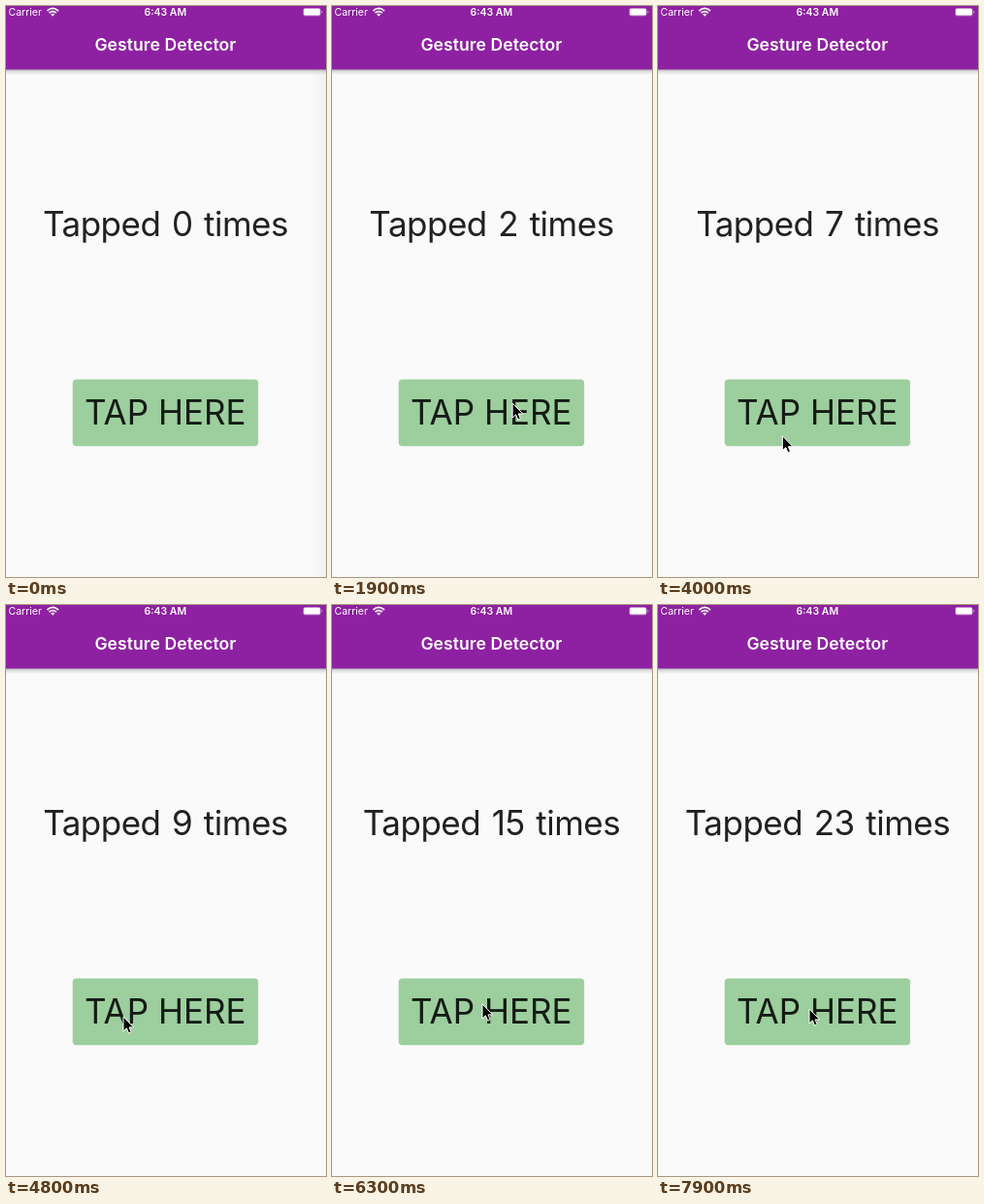
These frames come from a looping animation (330 by 588 pixels, 8 s). An HTML page:

```html
<!DOCTYPE html>
<html lang="en">
<head>
<meta charset="utf-8">
<title>Gesture Detector</title>
<style>
  html, body { margin: 0; height: 100%; overflow: hidden; background: #fafafa; }
  svg { display: block; width: 330px; height: 588px; font-family: Inter, Roboto, sans-serif; }
  .mid { text-anchor: middle; }
  .big { font-size: 35px; fill: #000; fill-opacity: .87; }
  #count { letter-spacing: -.5px; word-spacing: 2.2px; }
  .bar { fill: #fff; }
</style>
</head>
<body>
<svg viewBox="0 0 330 588">
  <defs>
    <linearGradient id="drop" x2="0" y2="1">
      <stop offset="0" stop-color="#000" stop-opacity=".32"/>
      <stop offset=".4" stop-color="#000" stop-opacity=".12"/>
      <stop offset="1" stop-color="#000" stop-opacity="0"/>
    </linearGradient>
    <linearGradient id="side">
      <stop offset="0" stop-color="#000" stop-opacity="0"/>
      <stop offset="1" stop-color="#000" stop-opacity=".04"/>
    </linearGradient>
  </defs>
  <rect width="330" height="588" fill="#fafafa"/>
  <rect id="edge" x="314" y="65" width="16" height="523" fill="url(#side)"/>
  <rect y="65" width="330" height="6" fill="url(#drop)"/>
  <rect width="330" height="65.4" fill="#8e20a2"/>

  <g class="bar">
    <text x="2.5" y="10" font-size="10.5">Carrier</text>
    <text class="mid" x="164.3" y="10" font-size="10.5" font-weight="600">6:43 AM</text>
    <text class="mid" x="164.4" y="46" font-size="17.6" font-weight="600" letter-spacing=".05">Gesture Detector</text>
    <path d="M42.4 5Q48.2-.2 54 5M44.5 7.2Q48.2 4 51.9 7.2" fill="none" stroke="#fff" stroke-width="1.7"/>
    <path d="M46.1 8.6Q48.2 7 50.3 8.6L48.2 10.8Z"/>
    <rect x="306.3" y="2" width="18.4" height="8.4" rx="2.2" fill-opacity=".35"/>
    <rect x="307.2" y="2.8" width="16.6" height="6.8" rx="1.4"/>
    <path d="M325.4 4.7Q327.6 6.2 325.4 7.7Z" fill-opacity=".6"/>
  </g>

  <text id="count" class="mid big" x="164.5" y="237"></text>
  <rect x="68.7" y="384.4" width="191.4" height="68.8" rx="4" fill="#9ccf9d"/>
  <text class="mid big" x="164.3" y="431">TAP HERE</text>
  <path id="cursor" d="M0 0V15L3.4 11.8L5.6 17L8.2 15.9L6 10.9H10.7Z"
        fill="#000" stroke="#fff" stroke-width="1" stroke-linejoin="round"/>
</svg>
<script>
const LOOP = 8000, STEP = 100;
// time, number of taps: the tapping speeds up
const pace = [[600, 0], [1400, 2], [2000, 3], [3100, 6], [4700, 9], [6200, 15], [7800, 23]];
// time, x, y of the pointer tip
const path = [
  [100, 326, 480], [900, 187, 409], [2200, 186, 409], [3300, 144, 408], [3700, 130, 447],
  [4800, 121, 424], [6300, 155, 411], [7300, 134, 417], [7900, 156, 416]
];
const get = id => document.getElementById(id);
const count = get('count'), cursor = get('cursor'), edge = get('edge');
const linear = u => u, smooth = u => u * u * (3 - 2 * u);

// values at time t between key points, held beyond both ends
function at(keys, t, ease) {
  const next = keys.findIndex(k => k[0] > t);
  if (next < 1) return keys.at(next).slice(1);
  const [t0, ...from] = keys[next - 1], [t1, ...to] = keys[next];
  const k = ease((t - t0) / (t1 - t0));
  return from.map((v, i) => v + (to[i] - v) * k);
}

function draw(now) {
  const t = Math.floor(now % LOOP / STEP) * STEP;
  const text = `Tapped ${Math.floor(at(pace, t, linear)[0] + 1e-6)} times`;
  if (count.textContent !== text) count.textContent = text;
  cursor.setAttribute('transform', `translate(${at(path, t, smooth)})`);
  cursor.style.visibility = t < path[0][0] ? 'hidden' : 'visible';
  edge.style.opacity = Math.max(0, 1 - t / 300);
}

let start;
function tick(now) {
  start ??= now;
  draw(now - start);
  requestAnimationFrame(tick);
}
draw(0);
requestAnimationFrame(tick);
</script>
</body>
</html>
```
